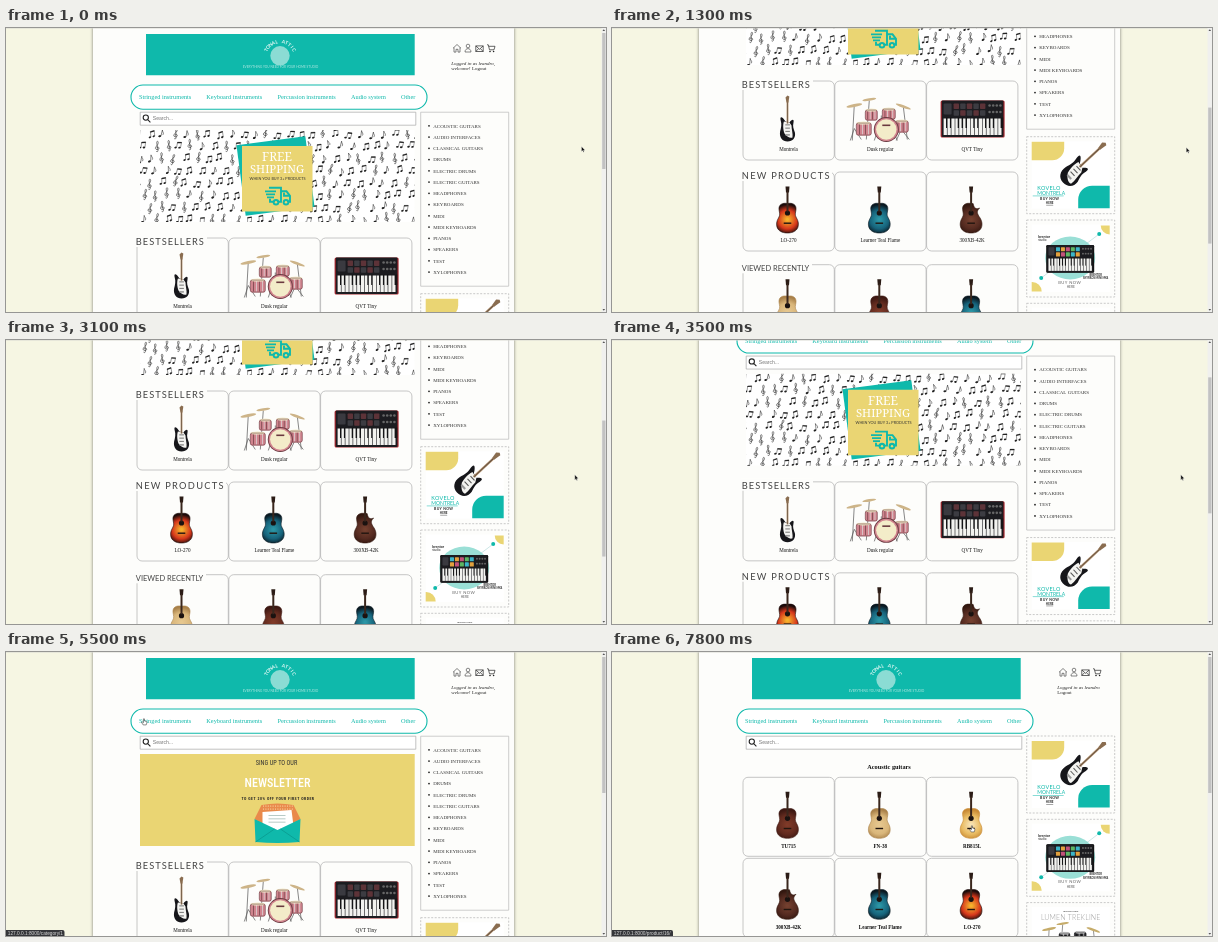
An HTML page with a canvas that plays this animation: 600 px wide and 284 px high, repeating every 8000 ms.

```html
<!DOCTYPE html>
<html lang="en">
<head>
<meta charset="utf-8">
<title>Instrument shop</title>
<style>
html, body { margin: 0; width: 100%; height: 100%; overflow: hidden; background: #f6f6e3; }
canvas { display: block; width: 600px; height: 284px; }
</style>
</head>
<body>
<canvas id="stage"></canvas>
<script>
const W = 600, H = 284, LOOP = 8000;
const canvas = document.getElementById('stage');
const ratio = window.devicePixelRatio || 1;
canvas.width = W * ratio;
canvas.height = H * ratio;
const c = canvas.getContext('2d');

const TEAL = '#0fb9ab', YELLOW = '#ead573', CREAM = '#f6f6e3', PAPER = '#fdfdfb', INK = '#222';
const SERIF = '"Liberation Serif", serif';
const SANS = '"Liberation Sans", sans-serif';
const LATO = 'Lato, sans-serif';
const SLIM = '"Roboto Condensed", "Open Sans Condensed", Roboto, sans-serif';

// ---- helpers ----
function rect(x, y, w, h, fill, r = 0) {
  c.fillStyle = fill;
  c.beginPath();
  c.roundRect(x, y, w, h, r);
  c.fill();
}
function frame(x, y, w, h, color, lw = 0.8, r = 0, dash = []) {
  c.strokeStyle = color;
  c.lineWidth = lw;
  c.setLineDash(dash);
  c.beginPath();
  c.roundRect(x, y, w, h, r);
  c.stroke();
  c.setLineDash([]);
}
function oval(x, y, rx, ry, fill, turn = 0) {
  c.fillStyle = fill;
  c.beginPath();
  c.ellipse(x, y, rx, ry, turn, 0, Math.PI * 2);
  c.fill();
}
function path(d, fill, stroke, lw = 0.8) {
  const p = new Path2D(d);
  if (fill) { c.fillStyle = fill; c.fill(p); }
  if (stroke) { c.strokeStyle = stroke; c.lineWidth = lw; c.stroke(p); }
}
function at(x, y, draw, scale = 1, turn = 0) {
  c.save();
  c.translate(x, y);
  c.rotate(turn);
  c.scale(scale, scale);
  draw();
  c.restore();
}
// y is the middle of the capital letters
function text(s, x, y, size, o = {}) {
  c.font = `${o.style || ''} ${o.weight || 400} ${size}px ${o.font || SERIF}`;
  c.letterSpacing = (o.gap || 0) + 'px';
  c.textAlign = o.align || 'left';
  c.fillStyle = o.color || INK;
  c.fillText(s, x, y + size * 0.34);
  c.letterSpacing = '0px';
}
const mid = (s, x, y, size, o) => text(s, x, y, size, { align: 'center', ...o });

function random(seed) {
  return () => (seed = (seed * 16807) % 2147483647) / 2147483647;
}
const ease = p => p * p * (3 - 2 * p);
function track(keys, t) {
  let i = 0;
  while (i < keys.length - 1 && keys[i + 1][0] <= t) i++;
  const a = keys[i], b = keys[i + 1] || a;
  const p = b === a ? 0 : Math.max(0, (t - a[0]) / (b[0] - a[0]));
  return a.slice(1).map((v, k) => v + (b[k + 1] - v) * p);
}

// ---- instruments, 46 units tall, hanging from the origin ----
function acoustic([inner, middle, edge], cut) {
  path('M-2 0H2L1.5 6H-1.5Z', '#2b1c16');
  const g = c.createRadialGradient(0, 33, 1, 0, 33, 15);
  g.addColorStop(0, inner);
  g.addColorStop(0.6, middle);
  g.addColorStop(1, edge);
  path('M0 17C-5 16-9 18-8.5 23C-8 27-7 28-9 31.5C-13 38-11 46.5 0 46.5C11 46.5 13 38 9 31.5' +
    (cut ? 'C6 27 5 25 8.5 21.5C5 23 3 22 2 17Z' : 'C7 28 8 27 8.5 23C9 18 5 16 0 17Z'), g, edge, 0.6);
  oval(0, 26.5, 2.6, 2.6, '#1a1210');
  rect(-1, 5, 2, 20, '#3a271d');
  rect(-3.8, 36, 7.6, 1.4, '#21150f');
}
function electric() {
  path('M-2 26C-5 21-8 20-6.8 25C-5.6 29-6.4 32-7.4 36C-8.4 42-5 46 0 46C5.4 46 8.4 42 7.4 37C6 33 5 31 6 27C6.8 23 4 24 2 27Z', '#16161a');
  path('M-3.6 26C-5 30-4 35-3 38C0 42 3 43 5 42C5.6 38 4 34 4 30L2 27Z', '#f4f4f1');
  rect(-0.9, 6, 1.8, 22, '#b08f6c');
  rect(-0.3, 6, 0.6, 22, '#59483b');
  path('M-1 7L-2 2L0 0L1.8 1L1 7Z', '#8a6d50');
  for (let i = 0; i < 3; i++) rect(-2.2, 29 + i * 3.2, 4.6, 0.8, '#555');
  rect(-2, 38.6, 4.4, 1.6, '#999');
}
function drums(shell, dark, skin, brass) {
  path('M-25-15L-27 21M-10-19L-13 20M24-13L28 20M-29 21L-25 9L-18 20M17 21L22 10L30 20M-5 21L-2 12M18 21L14 12M2-4L2 0', null, '#555', 0.7);
  for (const [x, y, w, h] of [[-14, -10, 12, 11], [3, -11, 13, 11], [-23, 3, 15, 13], [16, 1, 13, 12]]) {
    rect(x, y, w, h, shell, 2);
    for (let i = 1; i < 5; i++) rect(x + i * w / 5 - 0.3, y + 1, 0.7, h - 2, i % 2 ? dark : '#ddd');
    oval(x + w / 2, y + 0.6, w / 2, 1.5, skin);
    frame(x, y + 0.6, w, h - 1, dark, 0.6, 2);
  }
  oval(7, 10, 12.5, 12.5, dark);
  oval(7, 10, 11.6, 11.6, shell);
  oval(7, 10, 10.2, 10.2, skin);
  rect(3, 5, 8, 1.6, dark);
  oval(-25, -14, 8, 1.5, brass, -0.2);
  oval(-10, -20, 7, 1.3, brass, -0.15);
  oval(24, -13, 8, 1.4, brass, 0.35);
}
// 64 x 37 pad controller
function controller(side, colors) {
  rect(0, 0, 64, 37, side, 1.5);
  rect(1.2, 0, 61.6, 36.6, '#1c1c20', 1);
  rect(3, 3, 8, 11, '#3a3a40', 1);
  for (let i = 0; i < 10; i++) {
    const x = 13 + (i % 5) * 6.6, y = 3 + Math.floor(i / 5) * 6.8;
    rect(x, y, 5.4, 5.4, colors[i % colors.length], 0.7);
  }
  for (let i = 0; i < 8; i++) oval(49 + (i % 4) * 3.6, 5 + Math.floor(i / 4) * 6.5, 1.3, 1.3, '#666');
  for (let i = 0; i < 15; i++) {
    rect(3 + i * 3.9, 18, 3.3, 16.5, '#f3f3f0');
    if (![2, 6, 9, 13].includes(i)) rect(5.4 + i * 3.9, 17, 2.6, 10.5, '#151517');
  }
}
const WOOD = {
  fire: ['#f5b22c', '#d6371b', '#1c0b0a'],
  blue: ['#2b95a5', '#16627a', '#0a1820'],
  dark: ['#74402f', '#542a20', '#32170f'],
  pale: ['#e6c78f', '#d9b67a', '#a9814a'],
  red: ['#7f3a28', '#632b1f', '#3d1812'],
  gold: ['#f7e2b4', '#e9bb62', '#c88a35']
};
const STOCK = {
  strat: ['Montrela', electric],
  kit: ['Dusk regular', () => at(0, 24, () => drums('#d0848e', '#6b3a40', '#f3ecc9', '#cdb488'))],
  pads: ['QVT Tiny', () => at(-30.5, 5, () => controller('#a3262d', ['#5d3338', '#3c3c42']))],
  fire: ['LO-270', () => acoustic(WOOD.fire)],
  blue: ['Learner Teal Flame', () => acoustic(WOOD.blue)],
  dark: ['300XB-42K', () => acoustic(WOOD.dark, true)],
  pale: ['FN-38', () => acoustic(WOOD.pale)],
  red: ['TU715', () => acoustic(WOOD.red)],
  gold: ['RB815L', () => acoustic(WOOD.gold)]
};
function shelf(top, keys, weight) {
  keys.forEach((key, i) => {
    const x = 131 + i * 91.8, [name, draw] = STOCK[key];
    frame(x, top, 91.3, 79, '#b8b8b8', 0.8, 5);
    at(x + 44.5, top + 14.5, draw);
    mid(name, x + 45.5, top + 68.5, 5.1, { weight, color: '#111' });
  });
}
function heading(s, y, size, gap, cover) {
  rect(129, y - 7, cover, 12, PAPER);
  text(s, 129.8, y, size, { font: LATO, gap, color: '#444' });
}

// ---- page header ----
function header(greeting) {
  rect(140, 6, 268.7, 41.3, TEAL);
  oval(274, 27.8, 9.7, 9.7, '#8bdcd4');
  [...'TONAL ATTIC'].forEach((ch, i) => at(274, 29, () =>
    mid(ch, 0, -15.5, 4.8, { font: LATO, weight: 700, color: '#e9faf7' }), 1, (i - 5) * 0.22));
  mid('EVERYTHING YOU NEED FOR YOUR HOME STUDIO', 274.5, 39.3, 3.15, { font: LATO, color: '#b5e8e2' });

  at(451, 20.3, () => path('M-4 0L0-3.8L4 0M-3-.8V3.8H-1V1H1V3.8H3V-.8', null, '#444', 0.65));
  at(462, 20, () => path('M-3 4C-3-.5 3-.5 3 4ZM-1.8-2A1.8 1.8 0 1 1 1.8-2A1.8 1.8 0 1 1-1.8-2Z', null, '#444', 0.65));
  at(473.5, 20.7, () => path('M-3.7-2.8H3.7V2.8H-3.7ZL0 .6L3.7-2.8M-3.7 2.8L-1 0M3.7 2.8L1 0', null, '#333', 0.75));
  at(485, 20.3, () => {
    path('M-4-3.5H-2.7L-1.5 1.5H3L4-2H-2.3', null, '#333', 0.75);
    oval(-1, 3.2, 0.8, 0.8, INK);
    oval(2.6, 3.2, 0.8, 0.8, INK);
  });
  text('Logged in as leandro' + (greeting ? ',' : ''), 445.3, 35, 5, { style: 'italic' });
  if (greeting) text('welcome!', 445.3, 40.5, 5, { style: 'italic' });
  text('Logout', greeting ? 466 : 445.3, 40.5, 5);

  rect(125, 57, 296, 24.2, '#fff', 12);
  frame(125, 57, 296, 24.2, TEAL, 1.1, 12);
  [['Stringed', 133], ['Keyboard', 200.3], ['Percussion', 271.5]].forEach(([s, x]) =>
    text(s + ' instruments', x, 69, 6.3, { color: TEAL }));
  text('Audio system', 345, 69, 6.3, { color: TEAL });
  text('Other', 395, 69, 6.3, { color: TEAL });

  rect(134, 84, 276, 13.3, '#fff');
  frame(134.2, 84.2, 275.6, 13, '#a8a8a8', 0.7);
  path('M142.4 89.6A2.6 2.6 0 1 1 137.2 89.6A2.6 2.6 0 1 1 142.4 89.6M141.7 91.6L144.4 94.3', null, '#222', 1.1);
  text('Search...', 146.8, 90.3, 5.1, { font: SANS, color: '#777' });
}

// ---- banners ----
const NOTES = [];
{
  const rnd = random(71);
  for (let row = 0; row < 8; row++)
    for (let col = 0; col < 25; col++)
      NOTES.push([col * 11.6 + (row % 2) * 5 + rnd() * 4 - 3, row * 12.2 + rnd() * 4 + 2,
        Math.floor(rnd() * 3), rnd() * 0.5 - 0.2]);
}
function note(kind) {
  if (kind === 0) {
    oval(-0.9, 3.5, 1.7, 1.2, INK, -0.4);
    path('M.5 3.4V-4.4C.8-2.2 3.6-1.6 2.4 1.2', null, INK, 0.6);
  } else if (kind === 1) {
    oval(-2.7, 3.4, 1.5, 1.1, INK, -0.4);
    oval(1.9, 2.6, 1.5, 1.1, INK, -0.4);
    path('M-1.5 3.4V-3.2L3.1-4V2.6', null, INK, 0.5);
    path('M-1.7-3.4L3.3-4.3V-2.9L-1.7-2Z', INK);
  } else {
    path('M-1.4 5.6C0 6.8 1.1 5.6 .7 4L-.5-4C-.8-7 1.6-7 1.2-4C.8-1-2.6 0-2.2 2.2C-1.6 4.4 2.4 4 2 1.6C1.4 0-.8.4-.5 2', null, INK, 0.65);
  }
}
function shipping() {
  rect(0, 0, 275, 92, '#fff');
  for (const [x, y, kind, turn] of NOTES) at(x, y, () => note(kind), 0.85, turn);
  at(135.5, 46, () => rect(-34.7, -35.5, 69.4, 71, TEAL), 1, -0.13);
  rect(102, 16, 70.5, 65.5, YELLOW);
  const slab = { font: '"Noto Serif", serif', weight: 300, color: '#fff' };
  mid('FREE', 137, 26.7, 12, slab);
  mid('SHIPPING', 137, 39.3, 11.4, slab);
  mid('WHEN YOU BUY 3+ PRODUCTS', 137.5, 48.5, 3.8, { font: LATO, color: '#333' });
  at(138, 65.8, () => {
    path('M-9-8H3V6H1M-5 6H-8V3M3-4.5H8.5L12 0V6H11M6-3V0H12', null, TEAL, 1.9);
    path('M-13-4.5H-2M-12-1.5H-3M-11 1.5H-4', null, TEAL, 1.7);
    for (const x of [-2, 8]) { oval(x, 6.5, 3.3, 3.3, TEAL); oval(x, 6.5, 1.2, 1.2, YELLOW); }
  });
}
function newsletter() {
  rect(0, 0, 275, 92, YELLOW);
  mid('SING UP TO OUR', 136.5, 9, 6.3, { font: SLIM, color: '#333' });
  mid('NEWSLETTER', 137.5, 28.5, 12, { font: SLIM, weight: 500, color: '#fff' });
  mid('TO GET 20% OFF YOUR FIRST ORDER', 138, 45, 3.9, { font: SLIM, weight: 700, gap: 0.5 });
  at(137.5, 70, () => {
    path('M-23-5L-16-19Q0-22 16-19L23-5L0 9Z', '#e98a4c');
    for (let i = 0; i < 26; i++) oval(-14 + (i % 13) * 2.4, -18 + Math.floor(i / 13) * 3, 0.6, 0.6, '#fae6b8');
    path('M-15-12L14-14L16 2L0 10L-15 4Z', '#fff');
    for (let i = 0; i < 3; i++) rect(-9, -9 + i * 3.4, 17, 0.8, '#9fb9b3');
    path('M-23-5L0 6L23-5L22 18Q0 20-22 18Z', TEAL);
    path('M-22 18L-3 5M22 18L3 5', null, '#078f85', 0.6);
  });
}
function carousel(t) {
  const p = ease(Math.min(1, Math.max(0, (t - 4650) / 650)));
  c.save();
  c.beginPath();
  c.rect(134, 102, 274.7, 92);
  c.clip();
  if (p < 1) at(134 - 275 * p, 102, shipping);
  if (p > 0) at(409 - 275 * p, 102, newsletter);
  c.restore();
}

// ---- sidebar ----
const CATEGORIES = ['ACOUSTIC GUITARS', 'AUDIO INTERFACES', 'CLASSICAL GUITARS', 'DRUMS',
  'ELECTRIC DRUMS', 'ELECTRIC GUITARS', 'HEADPHONES', 'KEYBOARDS', 'MIDI', 'MIDI KEYBOARDS',
  'PIANOS', 'SPEAKERS', 'TEST', 'XYLOPHONES'];
function categories() {
  frame(414.7, 84.2, 88, 174, '#b8b8b8', 0.7);
  CATEGORIES.forEach((s, i) => {
    const y = 97.8 + i * 11.25;
    oval(423, y, 0.9, 0.9, INK);
    text(s, 427.2, y, 5, { color: '#333' });
  });
}
function adFrame() {
  frame(0, 0, 88, 77, '#b4b4b4', 0.7, 0, [2, 1.5]);
  rect(5, 4.5, 78, 67.5, '#fff');
}
function guitarAd() {
  adFrame();
  rect(5, 5, 32.5, 18.5, YELLOW, [0, 0, 12, 0]);
  rect(51.5, 49, 31.5, 22.5, TEAL, [14, 0, 0, 0]);
  at(79, 6, electric, 1.27, 0.82);
  text('KOVELO', 10.5, 51.3, 5.5, { font: LATO, color: TEAL, gap: 0.3 });
  text('MONTRELA', 10.5, 56.3, 5.1, { font: LATO, color: TEAL });
  rect(6, 59, 31, 0.5, TEAL);
  mid('BUY NOW', 23, 62, 3.5, { font: LATO, weight: 700, gap: 0.3 });
  mid('HERE', 23, 66.3, 3, { font: LATO, weight: 700 });
  rect(19.5, 68.2, 7, 0.4, INK);
}
function keysAd() {
  adFrame();
  rect(74, 5.5, 9, 9, YELLOW, [0, 0, 0, 9]);
  rect(5, 62, 10, 9.5, YELLOW, [0, 10, 0, 0]);
  oval(43.5, 38, 25, 21.5, '#9adfd6');
  path('M72.5 14L14.5 58', null, '#9cc', 0.5);
  oval(72.5, 14, 2, 2, TEAL);
  oval(14.5, 58, 2, 2, TEAL);
  at(19.5, 25, () => controller('#111', ['#3bb5c9', '#e2a13e', '#c2527a', '#5db663']), 0.75);
  text('brentor', 11.5, 16.7, 3.6, { font: LATO, weight: 700 });
  text('studio', 11.5, 19.5, 3, { font: LATO });
  mid('BRENTOR', 69, 55.2, 2.7, { font: LATO, weight: 700 });
  mid('SKYPADS MINI MK4', 69, 58.3, 2.7, { font: LATO, weight: 700 });
  mid('BUY NOW', 43, 62.5, 4.2, { font: LATO, color: '#666', gap: 0.4 });
  mid('HERE', 44, 67.3, 3.2, { font: LATO, color: '#555' });
}
function drumsAd() {
  adFrame();
  mid('discover now', 44, 9, 2.6, { font: LATO });
  mid('LUMEN TREKLINE', 44, 15, 7, { font: LATO, weight: 300, color: '#999', gap: 0.15 });
  at(45, 39, () => drums('#2a2a2d', '#0c0c0e', '#dedede', '#c6ac6a'), 0.9);
  mid('BUY NOW', 43.5, 62.5, 3.2, { font: LATO, weight: 700 });
  mid('HERE', 44, 66.5, 2.8, { font: LATO, weight: 700 });
}
function ads(top) {
  [guitarAd, keysAd, drumsAd].forEach((ad, i) => at(414.7, top + i * 83.3, ad));
}

// ---- pages ----
const LINKS = [
  [91, ['412 Tempo Street', '30918, Lane', 'Nowhere', 'tonalattic@example.com', '+00-555-010-0199']],
  [193, ['Contact', 'Our company', 'Privacy Policy', 'Terms of Use']],
  [298, ['Help', 'Shipping', 'Returns', 'Payments', 'Newsletter']],
  [404, ['My profile', 'Order status']]
];
function footer() {
  c.save();
  c.shadowColor = 'rgba(0,0,0,.45)';
  c.shadowBlur = 3 * ratio;
  rect(85.5, 522.5, 424, 47.5, CREAM);
  c.restore();
  frame(85.5, 522.5, 424, 47.5, '#bdbdb4', 0.7);
  text('TONAL ATTIC', 88.3, 528.2, 6.6, { font: LATO, color: '#333' });
  const big = { font: LATO, color: '#444', gap: 1.15 };
  text('ABOUT US', 193, 527.7, 9.3, big);
  text('SUPPORT', 298.5, 527.7, 9.3, big);
  text('MY ACCOUNT', 403.5, 528, 9.3, big);
  LINKS.forEach(([x, list]) => list.forEach((s, i) => text(s, x, 536.5 + i * 5.7, 5)));
}
function sheet(bottom) {
  c.save();
  c.shadowColor = 'rgba(0,0,0,.5)';
  c.shadowBlur = 3 * ratio;
  rect(87, -5, 421, bottom + 5, PAPER);
  c.restore();
}
function home(t) {
  sheet(523);
  header(true);
  carousel(t);
  categories();
  ads(265.7);
  shelf(210, ['strat', 'kit', 'pads']);
  shelf(301, ['fire', 'blue', 'dark']);
  shelf(393.7, ['pale', 'red', 'blue']);
  heading('BESTSELLERS', 214, 9.3, 1, 72);
  heading('NEW PRODUCTS', 305, 9.3, 1.25, 91);
  heading('VIEWED RECENTLY', 397.3, 7.5, 0, 71);
  footer();
}
function category() {
  sheet(600);
  header(false);
  ads(84);
  mid('Acoustic guitars', 277, 114.7, 6.3, { weight: 700, color: '#111' });
  shelf(125.3, ['red', 'pale', 'gold'], 700);
  shelf(206.3, ['dark', 'blue', 'fire'], 700);
}

// ---- browser parts ----
function status(s) {
  const w = s.includes('category') ? 58.5 : 61;
  rect(0, 278, w, 6, '#35363a', [0, 2, 0, 0]);
  text(s, 1.8, 281.2, 4.75, { font: SANS, color: '#dcdcdc' });
}
function scrollbar(scroll) {
  rect(595.5, 0, 4.5, H, '#f0f0ee');
  rect(596.2, 5 + scroll * 0.475, 3.3, 136, '#c2c2c2');
  path('M596.5 3L597.8 1.2L599.1 3ZM596.5 281L597.8 282.8L599.1 281Z', '#555');
}
function arrow() {
  path('M0 0V6L1.4 4.8L2.3 6.8L3.2 6.4L2.3 4.4H4.2Z', '#111', '#fff', 0.35);
}
function hand() {
  path('M-.7-2.5Q0-3.3.6-2.5V0L3 .6Q3.6 1 3.3 2.4L2.6 4.6H-1L-2.8 1.8Q-2.6.8-1.6 1.3L-.7 2Z', '#fff', '#222', 0.6);
}

const SCROLL = [[500, 0], [1300, 157], [1900, 288], [2500, 288], [3100, 159], [3800, 0]];
const POINTER = [[0, 575.5, 118.5], [300, 574.3, 119.5], [1900, 574.3, 119.5], [2300, 568.8, 134.8],
  [3700, 568.8, 134.8], [4200, 191.5, 76.5], [4500, 138, 69], [6100, 138, 69], [6800, 178, 168],
  [6950, 178, 168], [7300, 268, 172], [7550, 268, 172], [7800, 360, 176]];
const LOAD = 5600;

function draw(t) {
  const [scroll] = track(SCROLL, t);
  const [px, py] = track(POINTER, t);
  c.setTransform(ratio, 0, 0, ratio, 0, 0);
  rect(0, 0, W, H, CREAM);
  at(0, -scroll, () => t < LOAD ? home(t) : category());

  rect(0, 0, W, 0.6, '#d9d9d2');
  if (scroll > 280) rect(0, 283, W, 1, '#cfcfc6');
  scrollbar(scroll);

  const onNav = t >= 4500 && t < 6200, onItem = t >= 6800;
  if (t >= 4700 && t < 6200) status('127.0.0.1:8000/category/1');
  else if (t >= 7000) status(`127.0.0.1:8000/product/${t < 7600 ? 12 : 16}/`);
  at(px, py, onNav || onItem ? hand : arrow, 0.85);
}

function tick(now) {
  draw(Math.floor((now % LOOP) / 100) * 100);
  requestAnimationFrame(tick);
}
requestAnimationFrame(tick);
</script>
</body>
</html>
```
